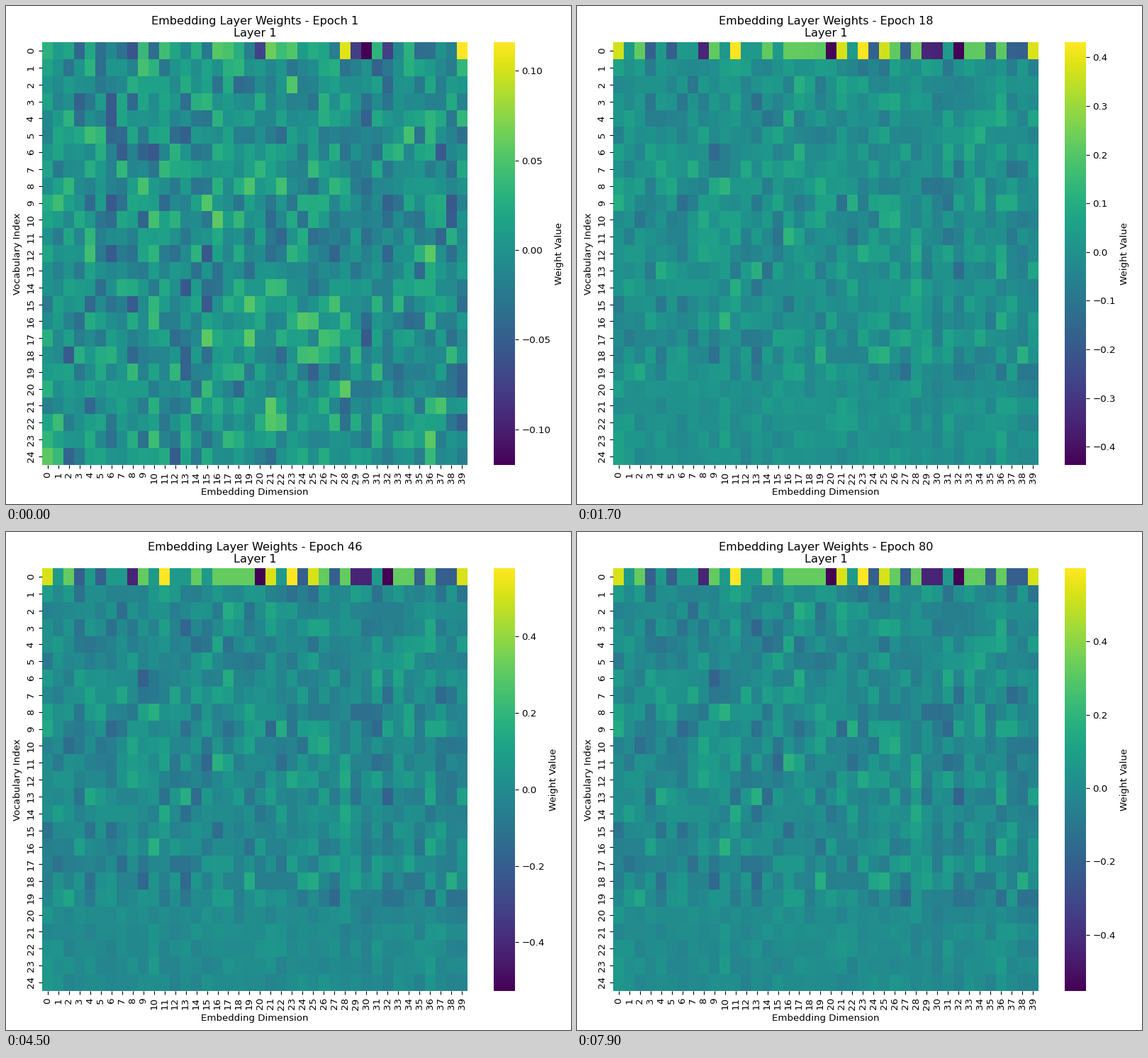
These frames come from a looping animation (797x702 px, 8 s). A matplotlib script:

```python
import numpy as np
import matplotlib.pyplot as plt
from matplotlib.animation import FuncAnimation

W, H, DPI = 797, 702, 96.7
ROWS, COLS, EPOCHS = 25, 40, 80

plt.rcParams["font.family"] = "DejaVu Sans"

# Range of the weights at a few epochs; in between it grows with sqrt(epoch).
KEYS = [1, 8, 18, 26, 38, 54, 80]
LOW = [-.1198, -.3296, -.437, -.480, -.516, -.537, -.553]
HIGH = [.1158, .323, .4306, .491, .566, .589, .599]

# Where in the range the first token's columns settle; the others stay near the middle.
SETTLED = {1: [11, 23], .94: [0, 21, 25, 39], .76: [2, 9, 14, 16, 17, 18, 19, 26, 28, 33, 34, 36],
           .3: [3, 5, 24, 27, 35, 37, 38], .1: [8, 29, 30], 0: [20, 32]}

rng = np.random.default_rng(7)

column_bias = np.zeros(COLS)
column_bias[[0, 10, 17, 19, 36]] = .014
column_bias[[6, 30, 32, 38]] = -.016
initial = np.clip(rng.normal(column_bias, .023, (ROWS, COLS)), -.055, .056)

# Rare tokens, in the last rows, hardly learn.
spread = np.where(np.arange(ROWS) < 20, .06, .012)[:, None]
drift = np.clip(rng.normal(column_bias, spread, (ROWS, COLS)), -.17, .17)

token_end = np.full(COLS, .54)
for level, columns in SETTLED.items():
    token_end[columns] = level
token_start = np.clip(.5 + .4 * (token_end - .5) + rng.normal(0, .1, COLS), .15, .85)
token_start[[28, 30, 39]] = .95, 0, 1


def weights(epoch):
    low, high = (np.interp(epoch ** .5, np.sqrt(KEYS), edge) for edge in (LOW, HIGH))
    growth = (high - HIGH[0]) / (HIGH[-1] - HIGH[0])
    grid = initial + growth * drift
    settled = 1 - np.exp((1 - epoch) / 5)
    share = token_start + settled * (token_end - token_start)
    grid[0] = low + share * (high - low)
    return grid, low, high


def add_axes(left, top, width, height):
    """Axes with the corner in pixels and the size in inches."""
    width, height = width * DPI / W, height * DPI / H
    return fig.add_axes([left / W, 1 - top / H - height, width, height])


fig = plt.figure(figsize=(W / DPI + 1e-9, H / DPI + 1e-9), dpi=DPI, facecolor="white")
ax = add_axes(51.2, 51.2, 6.2, 6.16)
cax = add_axes(688.4, 51.2, .308, 6.16)

mesh = ax.pcolormesh(initial, cmap="viridis")
ax.invert_yaxis()
ax.spines[:].set_visible(False)
ax.set_xticks(np.arange(COLS) + .5, range(COLS), rotation=90)
ax.set_yticks(np.arange(ROWS) + .5, range(ROWS), rotation=90, va="center")
ax.set_xlabel("Embedding Dimension")
ax.set_ylabel("Vocabulary Index")
title = ax.set_title("")

bar = fig.colorbar(mesh, cax=cax, label="Weight Value")
bar.outline.set_visible(False)


def draw(frame):
    epoch = frame + 1
    grid, low, high = weights(epoch)
    mesh.set_array(grid)
    mesh.set_clim(low, high)
    title.set_text(f"Embedding Layer Weights - Epoch {epoch}\nLayer 1")
    return mesh, title


anim = FuncAnimation(fig, draw, frames=EPOCHS, interval=100, repeat=True,
                     repeat_delay=0, blit=False)
plt.show()
```
